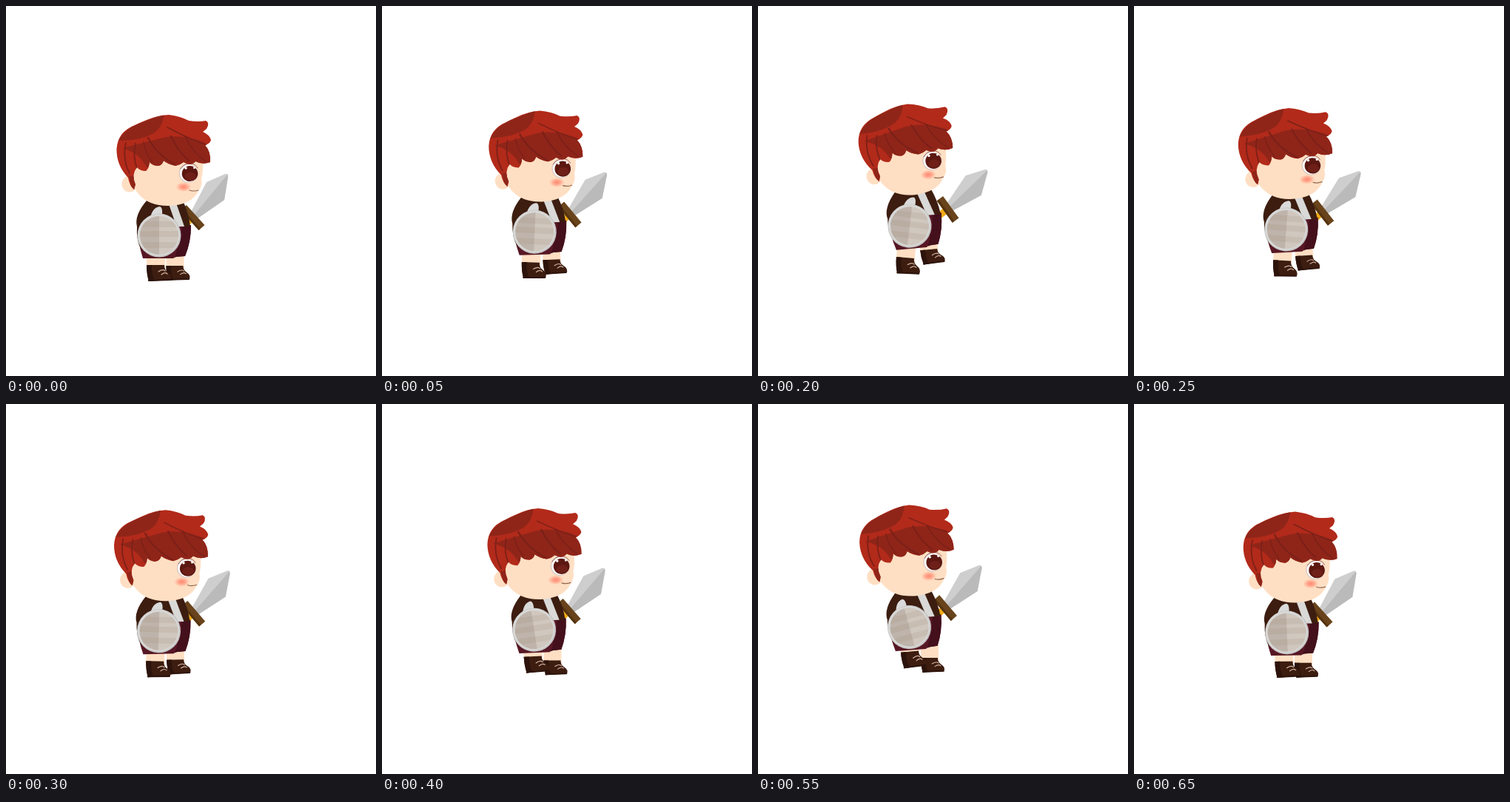
These frames come from a looping animation (500x500 px, 0.7 s). An HTML page with a canvas:

```html
<!DOCTYPE html>
<html lang="en">
<head>
<meta charset="utf-8">
<title>Walking swordsman</title>
<style>
  html, body { margin: 0; width: 100%; height: 100%; overflow: hidden; background: #fff; }
  canvas { display: block; width: 500px; height: 500px; }
</style>
</head>
<body>
<canvas id="stage" width="500" height="500"></canvas>
<script>
const ctx = document.getElementById('stage').getContext('2d');
const LOOP = 700, STEP = 50, STRIDE = 500 / 3;

const SKIN = '#ffdfc3', RED = '#b22a1a', DARK_RED = '#8f2519', STRAND = '#7c2018';
const BROWN = '#3c1d10', DARK_BROWN = '#2c130b', WINE = '#571724', DARK_WINE = '#43101c';

// Pivot, then [dx, dy, degrees] at the height of each of the two strides.
const RIG = {
  sword:   { pivot: [270, 260], first: [8.75, -11.25, 8], second: [2.2, -14, 2.5] },
  farLeg:  { pivot: [232, 360], first: [4.5, -28, -7],    second: [5, -11.5, 0] },
  nearLeg: { pivot: [206, 361], first: [-5, -12, 6],      second: [5.5, -22.5, -7] },
  torso:   { pivot: [213, 303], first: [-2, -17, -6.5],   second: [-2.8, -12.8, -6] },
  shield:  { pivot: [207, 310], first: [-2.5, -16, 8.5],  second: [-3.5, -12, -22] },
  head:    { pivot: [212, 208], first: [-16, -17.5, -6],  second: [-16.4, -14.3, -5.5] }
};

function fill(d, color) {
  ctx.fillStyle = color;
  ctx.fill(new Path2D(d));
}

function line(d, color, width, cap = 'round') {
  ctx.strokeStyle = color;
  ctx.lineWidth = width;
  ctx.lineCap = cap;
  ctx.stroke(new Path2D(d));
}

function oval(x, y, rx, ry, color) {
  ctx.fillStyle = color;
  ctx.beginPath();
  ctx.ellipse(x, y, rx, ry, 0, 0, Math.PI * 2);
  ctx.fill();
}

function clipped(d, draw) {
  ctx.save();
  ctx.clip(new Path2D(d));
  draw();
  ctx.restore();
}

function leg() {
  fill('M190 326H215V353H190Z', SKIN);
  fill('M190 350H214Q214 357 219 360Q225 364 223 370L193 372Q190 362 190 350Z', BROWN);
  fill('M190 350H197Q196 364 201 371L193 372Q190 362 190 350Z', DARK_BROWN);
  line('M193 371L222 370', DARK_BROWN, 2);
  line('M206 359Q212 355 215 358M210 363Q215 359 218 362', '#d5b5a2', 1.2);
}

const PARTS = {
  sword() {
    line('M251 287L241 296', '#f1ab18', 9, 'butt');
    fill('M248 282L271 238L296 227Q301 226 300 231L295 262L256 289Z', '#cecece');
    fill('M252 285L299 228Q300 229 300 231L295 262L256 289Z', '#bababa');
    line('M240 272.5L264.5 299.5', '#69431b', 10.5, 'butt');
    line('M238 275.5L261.5 302', '#55330f', 3, 'butt');
  },

  farLeg() {
    ctx.translate(34, 36);
    ctx.scale(.96, .9);
    leg();
  },

  nearLeg: leg,

  torso() {
    fill('M178 296H250Q250 319 242 338L229 339L226 341H185Q178 320 178 296Z', WINE);
    fill('M238 297H250Q250 319 242 338L229 339Q237 322 238 297Z', DARK_WINE);
    line('M229 339Q233 330 234 315', DARK_WINE, 1.5);
    fill('M190 263H239Q247 280 249 298H177Q173 283 190 263Z', BROWN);
    fill('M177 298Q176 316 182 328H190V296Z', BROWN);
    fill('M219 265H229.5L241 298H230.5Z', '#d9d9d8');
  },

  shield() {
    fill('M195 286Q198 272 208 271Q213 273 210 288Z', '#dadada');
    oval(207, 310, 29.5, 29.5, '#c4c4c3');
    oval(206.5, 309.5, 28.3, 28.3, '#d8d8d7');
    const face = 'M181 310A26 26 0 1 1 233 310A26 26 0 1 1 181 310Z';
    clipped(face, () => {
      fill('M180 283H234V337H180Z', '#d0c7be');
      for (const y of [291, 304, 319]) fill(`M180 ${y}h54v8h-54Z`, '#c8bdb3');
      fill('M180 283H207V337H180Z', 'rgba(140,125,112,.25)');
    });
  },

  head() {
    oval(167, 240.5, 10.5, 11, SKIN);
    fill('M164 205Q166 270 219 270Q251 269 260 250Q266 243 264 233Q267 225 266 202L230 175H175Z', SKIN);

    const blush = ctx.createRadialGradient(0, 0, 1, 0, 0, 11);
    blush.addColorStop(0, 'rgba(255,128,105,.85)');
    blush.addColorStop(.45, 'rgba(255,145,120,.65)');
    blush.addColorStop(1, 'rgba(255,180,150,0)');
    ctx.save();
    ctx.translate(240, 244.5);
    ctx.scale(1, .62);
    oval(0, 0, 11, 11, blush);
    ctx.restore();

    oval(246.5, 226, 12.8, 13, '#d8c6c0');
    oval(247, 226, 12, 12, '#fff');
    oval(248.5, 226.5, 10.8, 10.6, '#5c1711');
    oval(249, 230, 7.5, 5.5, '#6e2018');
    oval(243, 219, 1.7, 1.7, '#fff');
    oval(254.5, 218.5, 1.5, 1.5, '#fff');
    line('M236 220Q240 213 249 213Q256 213 259 219', '#8a4a40', .8);
    line('M248 249Q253 251 260 249', '#94664f', 1.2);

    const hair = 'M173 248Q167 243 165 232Q149 215 149.5 193Q151 170 174 161'
      + 'Q180 158 190 154Q204 148 220 147Q236 149 247 155Q260 157 270 155Q276 158 271 166L266 170'
      + 'Q275 174 277 181Q276 186 269 188Q277 197 276 211Q266 215 256 210'
      + 'Q250 217 240 211Q235 215 229 216Q219 214 213 209Q211 215 206 216'
      + 'Q198 216 194 211Q193 220 189 223Q181 223 177 218Q169 228 175 241Z';
    fill(hair, RED);
    clipped(hair, () => {
      fill('M152 182Q160 166 182 158L214 146Q211 164 201 171Q183 182 152 182Z', DARK_RED);
      fill('M157 192Q188 184 216 177Q250 173 278 190V218H190Q180 198 157 192Z', DARK_RED);
      line('M162 185Q157 207 167 226', STRAND, 1.8);
      line('M175 186Q171 203 177 220', STRAND, 1.8);
      line('M192 178Q203 200 228 214', STRAND, 2.3);
      line('M186 184Q188 199 198 211', STRAND, 1.5);
      line('M218 164Q250 181 272 188', STRAND, 1.5);
      line('M223 176Q232 196 247 209', STRAND, 2.3);
      line('M242 176Q252 198 270 210', STRAND, 1.7);
      fill('M166 229Q170 232 172 228L176 248H170Z', DARK_RED);
    });
  }
};

function drawPart(name, a, b) {
  const { pivot: [x, y], first, second } = RIG[name];
  const [dx, dy, turn] = first.map((v, i) => v * a + second[i] * b);
  ctx.save();
  ctx.translate(x + dx, y + dy);
  ctx.rotate(turn * Math.PI / 180);
  ctx.translate(-x, -y);
  PARTS[name]();
  ctx.restore();
}

function render(now) {
  const time = Math.floor((now % LOOP) / STEP) * STEP;
  const phase = time / STRIDE;
  const lift = peak => Math.max(0, 1 - Math.abs(phase - peak));
  ctx.fillStyle = '#fff';
  ctx.fillRect(0, 0, 500, 500);
  for (const name in RIG) drawPart(name, lift(1), lift(3));
}

const start = performance.now();
function tick() {
  render(performance.now() - start);
  requestAnimationFrame(tick);
}
tick();
</script>
</body>
</html>
```
